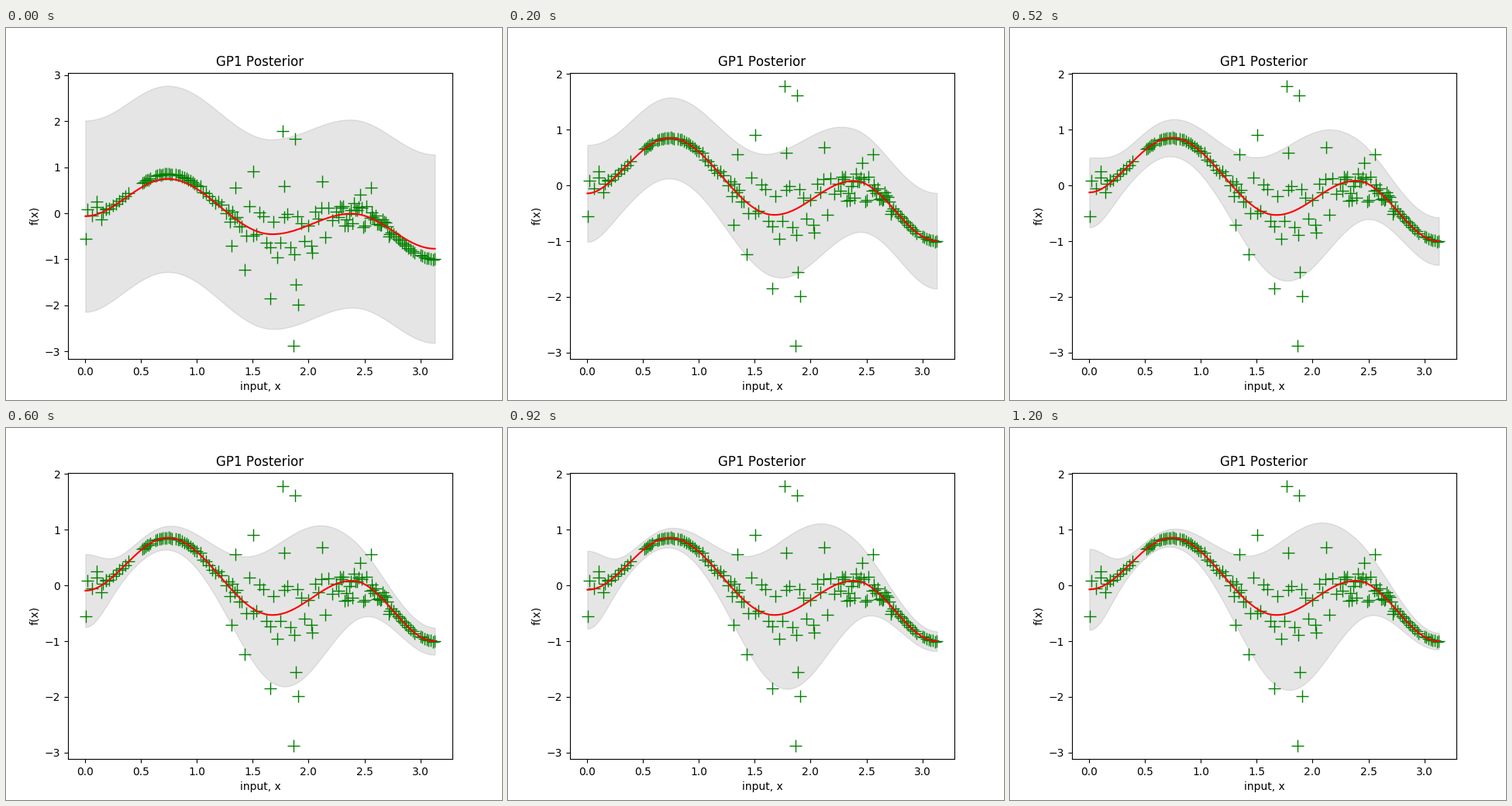
A matplotlib script that plays this animation: 640x480 px, repeating every 1.4 s.

```python
import matplotlib.pyplot as plt
import numpy as np
from matplotlib.animation import FuncAnimation

STEPS = 7
X_MIN, X_MAX = 0.003, 3.13
GRID = np.linspace(X_MIN, X_MAX, 300)
FIRST_YLIM, YLIM = (-3.166, 3.053), (-3.117, 2.026)

# Turning points of the posterior mean, before and after fitting
TURNS_X = [X_MIN, 0.74, 1.675, 2.385, X_MAX]
PRIOR_Y = np.array([-0.05, 0.745, -0.455, -0.01, -0.77])
FITTED_Y = np.array([-0.07, 0.855, -0.53, 0.085, -1.0])

# Runs of samples along the fitted curve: start, end, count, scatter
RUNS = [
    (0.02, 0.19, 5, 0.17), (0.16, 0.39, 9, 0.02), (0.51, 0.58, 6, 0.01),
    (0.63, 0.78, 10, 0.01), (0.81, 1.00, 11, 0.01), (1.03, 1.22, 8, 0.06),
    (1.26, 1.40, 8, 0.15), (1.44, 2.21, 26, 0.55), (2.25, 2.52, 20, 0.40),
    (2.55, 2.74, 16, 0.15), (2.76, 2.95, 11, 0.01), (3.00, 3.13, 8, 0.01),
]
OUTLIERS = [
    (0.006, -0.55), (0.105, 0.26), (1.31, -0.71), (1.345, 0.56),
    (1.425, -1.23), (1.505, 0.91), (1.655, -1.85), (1.77, 1.79),
    (1.78, 0.59), (1.865, -2.88), (1.88, 1.61), (1.885, -1.55),
    (1.905, -1.99), (2.03, -0.85), (2.12, 0.69), (2.56, 0.56),
]


def bump(x, center, width):
    return np.exp(-((x - center) / width) ** 2)


def cosine_path(x, turns_y):
    """Ease with half cosines from one turning point to the next."""
    place = np.interp(x, TURNS_X, np.arange(len(TURNS_X)))
    left = np.minimum(place.astype(int), len(TURNS_X) - 2)
    ease = (1 - np.cos(np.pi * (place - left))) / 2
    return turns_y[left] + (turns_y[left + 1] - turns_y[left]) * ease


def posterior(step):
    """Mean and half height of the band after some optimiser steps."""
    decay = 0.31 ** step
    noise = 1.89 * decay
    swing = noise * np.exp(-2.2 * noise)
    turns_y = FITTED_Y + (PRIOR_Y - FITTED_Y) * decay ** 3
    mean = cosine_path(GRID, turns_y) - 0.45 * swing * bump(GRID, X_MIN, 0.2)
    spread = (0.13 + noise
              + 0.60 / (1 + 5 * noise) * bump(GRID, X_MIN, 0.23)
              + 1.29 * np.exp(-1.8 * noise) * bump(GRID, 1.885, 0.59)
              + 0.85 * swing * bump(GRID, X_MAX, 0.32))
    return mean, spread


def make_samples():
    rng = np.random.default_rng(4)
    xs, ys = map(list, zip(*OUTLIERS))
    for start, end, count, scatter in RUNS:
        x = np.linspace(start, end, count)
        xs.extend(x)
        ys.extend(cosine_path(x, FITTED_Y) + rng.uniform(-scatter, scatter, count))
    return xs, ys


plt.rcParams["text.kerning_factor"] = 6
fig, ax = plt.subplots(figsize=(6.4, 4.8), dpi=100)
ax.set_title("GP1 Posterior")
ax.set_xlabel("input, x")
ax.set_ylabel("f(x)")
ax.set_xlim(-0.1525, 3.2867)

ax.plot(*make_samples(), "g+", markersize=12)
mean_line, = ax.plot(GRID, np.zeros_like(GRID), "r")
band = ax.fill_between(GRID, -1, 1, color="gray", alpha=0.2)


def update(step):
    mean, spread = posterior(step)
    mean_line.set_ydata(mean)
    upper = np.column_stack([GRID, mean + spread])
    lower = np.column_stack([GRID, mean - spread])
    band.set_verts([np.vstack([upper, lower[::-1]])])
    ax.set_ylim(FIRST_YLIM if step == 0 else YLIM)
    return mean_line, band


anim = FuncAnimation(fig, update, frames=STEPS, interval=200,
                     repeat=True, repeat_delay=0)
plt.show()
```
